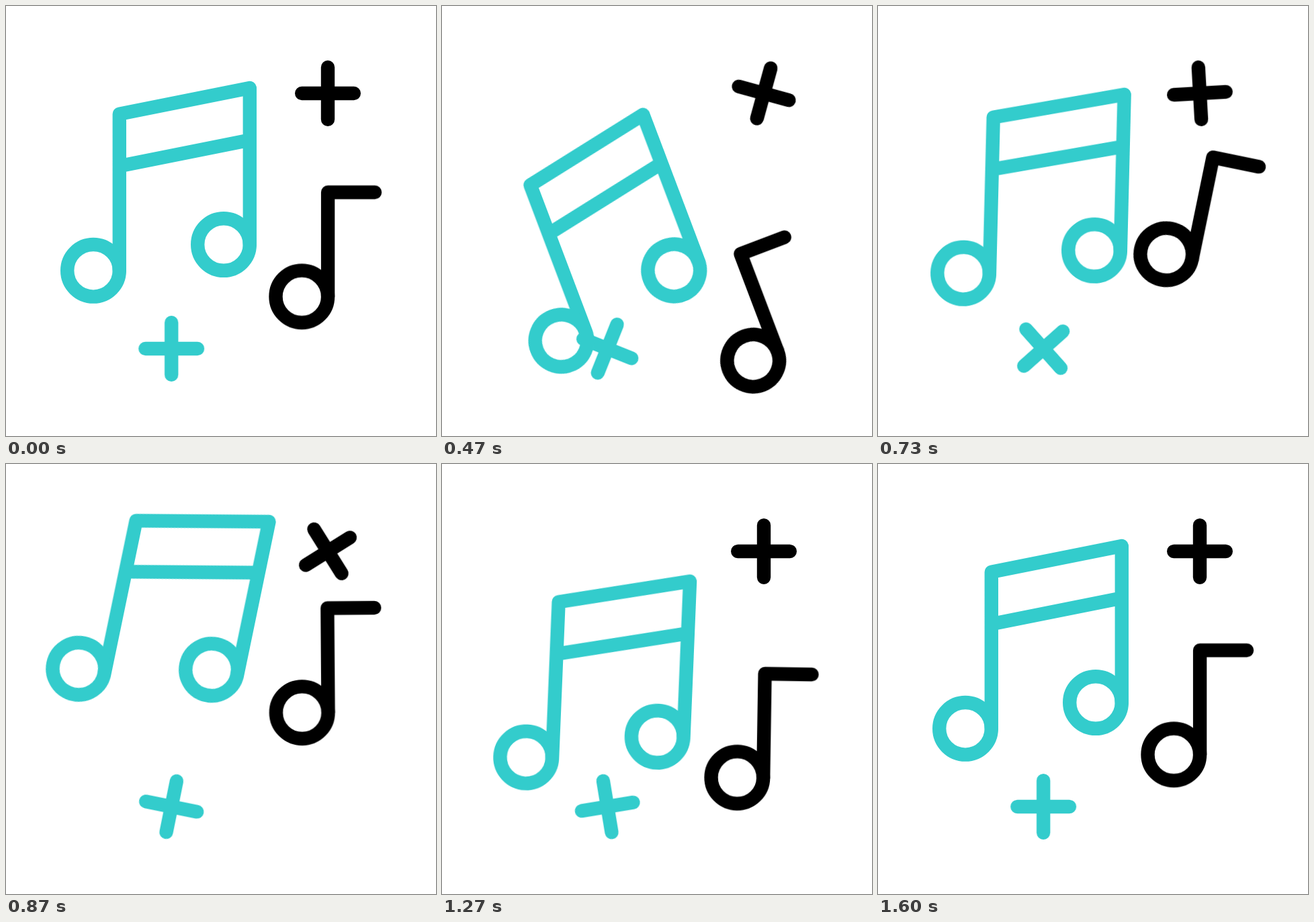
An HTML page that plays this animation: 640 by 640 pixels, repeating every 2000 ms.

```html
<!DOCTYPE html>
<html lang="en">
<head>
<meta charset="utf-8">
<title>Music notes</title>
<style>
  html, body { margin: 0; width: 100%; height: 100%; overflow: hidden; background: #fff; }
  svg { display: block; width: 100vw; height: 100vh; fill: none; stroke: #000;
        stroke-width: 20.4; stroke-linecap: round; stroke-linejoin: round; }
  .teal { stroke: #33cccc; }
</style>
</head>
<body>
<svg viewBox="0 0 640 640">
  <g class="teal" transform="translate(246.2 510)">
    <path id="tealPlus" d="M-38.8 0H38.8M0-38.8V38.8"/>
  </g>
  <g class="teal" transform="translate(227 277)">
    <g id="pair">
      <path d="M-58.2 116.8V-116.3L135.8-155.1V78M-58.2-38.7L135.8-77.5"/>
      <circle cx="-97" cy="116.8" r="38.8"/>
      <circle cx="97" cy="78" r="38.8"/>
    </g>
  </g>
  <g transform="translate(475 374.3)">
    <g id="single">
      <path d="M4.1 58.2V-97H74"/>
      <circle cx="-34.7" cy="58.2" r="38.8"/>
    </g>
  </g>
  <g transform="translate(479 130)">
    <path id="blackPlus" d="M-38.8 0H38.8M0-38.8V38.8"/>
  </g>
</svg>
<script>
const LOOP = 2000, STEPS = 48, STEP_MS = 100 / 3;
const TEAL_DELAY = 3;

const smooth = u => u * u * (3 - 2 * u);

// Eases from rest through each [step, value] key in turn
const ease = (...keys) => x => {
  let [x0, y0] = [0, 0];
  for (const [x1, y1] of keys) {
    if (x < x1) return y0 + (y1 - y0) * smooth(Math.max(0, (x - x0) / (x1 - x0)));
    [x0, y0] = [x1, y1];
  }
  return y0;
};

const lift = ease([13.8, 87], [24.1, -72], [35.2, 47], [43.6, 0]);
const sway = ease([12.9, -22], [22.6, 12], [28, -6], [34.5, 2.4], [40.5, 0]);
const spin = ease([13.5, -75], [37.8, 180]);

const bounce = n => `translate(0px, ${lift(n).toFixed(3)}px) rotate(${sway(n).toFixed(3)}deg)`;
const turn = n => `translate(0px, 0px) rotate(${spin(n).toFixed(3)}deg)`;

function play(id, pose, delay) {
  const frames = [];
  for (let n = 0; n <= STEPS; n++) {
    const at = Math.round(n * STEP_MS / 10) * 10;
    frames.push({ offset: at / LOOP, transform: pose(n - delay), easing: 'step-end' });
  }
  frames.push({ offset: 1, transform: pose(STEPS) });
  document.getElementById(id).animate(frames, { duration: LOOP, iterations: Infinity });
}

play('single', bounce, 0);
play('pair', bounce, TEAL_DELAY);
play('blackPlus', turn, 0);
play('tealPlus', turn, TEAL_DELAY);
</script>
</body>
</html>
```
